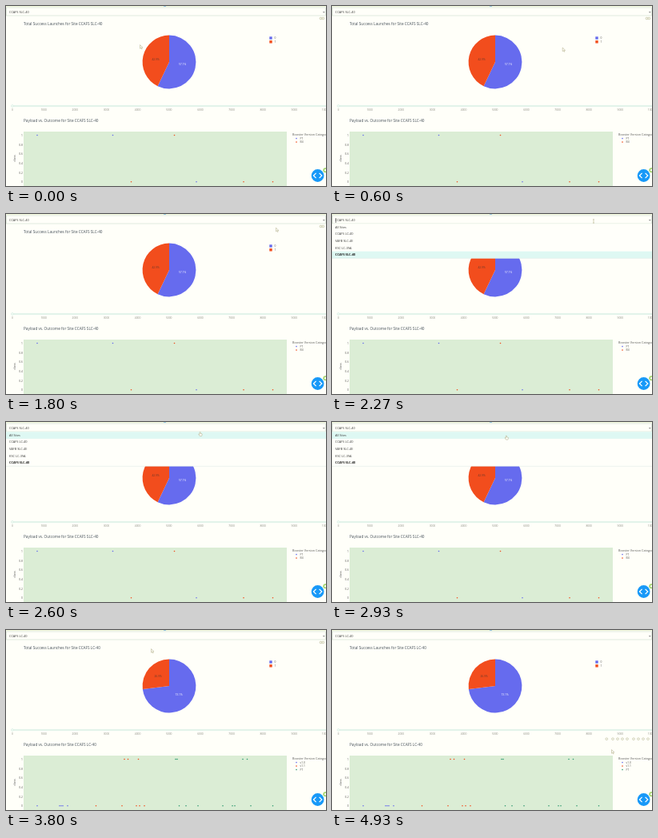
An HTML page for the animation above (4.99 s loop, 400 by 225 pixels).

```html
<!DOCTYPE html>
<html lang="en">
<head>
<meta charset="utf-8">
<title>Launch dashboard</title>
<style>
  html, body { margin: 0; width: 100%; height: 100%; overflow: hidden; background: #fffff9; }
  svg { display: block; width: 100vw; height: 100vh; }
  text { font-family: "Open Sans", "Noto Sans", sans-serif; font-size: 3.3px; fill: #555; }
  .title { font-size: 4.7px; fill: #46505a; }
  .field { font-size: 3.9px; fill: #3c3c3c; }
  .mid { text-anchor: middle; }
  .end { text-anchor: end; }
</style>
</head>
<body>
<svg id="stage" viewBox="0 0 400 225">
  <rect width="400" height="225" fill="#fffff9"/>
  <path d="M0 .5H400" stroke="#eef5d8"/>
  <path d="M197 .4h3" stroke="#78b4dc" stroke-width=".8"/>
  <g id="rail"></g>
  <rect x="22" y="157" width="329" height="68" fill="#dbedd5"/>
  <g id="axis"></g>
  <text class="mid" transform="translate(12 190.5) rotate(-90)" style="font-size:3.8px">class</text>
  <text x="358" y="162" style="font-size:3.8px">Booster Version Category</text>
  <g id="charts"></g>
  <g id="pieBar"></g>
  <g id="plotBar"></g>
  <rect x=".4" y="2" width="399.2" height="10" fill="#fffff9" stroke="#d5e2d4" stroke-width=".7"/>
  <text id="value" class="field" x="4" y="9.2"></text>
  <path d="M395.8 7h3l-1.5 1.7z" fill="#999"/>
  <g id="menu">
    <rect y="12.3" width="400" height="43" fill="#fffffa"/>
    <rect id="hover" width="400" height="8.6" fill="#def8f3"/>
    <g id="options"></g>
    <path d="M0 55.3H400" stroke="#d8e4e0" stroke-width=".5"/>
  </g>
  <path id="caret" d="M4.8 5v6" stroke="#333" stroke-width=".6"/>
  <circle cx="399.3" cy="205.2" r="3" fill="#a5d66f"/>
  <circle cx="399.3" cy="205.2" r="1.3" fill="#fffff9"/>
  <circle cx="389.6" cy="212" r="7.9" fill="#1899f8"/>
  <path d="M387.6 208.8l-3.2 3.2 3.2 3.2M391.6 208.8l3.2 3.2-3.2 3.2" fill="none" stroke="#fff" stroke-width="1.2"/>
  <g id="pointer" fill="#fffff9" stroke="#a8a47c" stroke-width=".5">
    <path id="arrow" d="M0 0v4.6l1.1-1 .8 1.7.8-.4-.8-1.6h1.5z" transform="translate(-1.5 -2.4)"/>
    <path id="beam" fill="none" d="M-1-2.2h2M0-2.2v4.4M-1 2.2h2"/>
    <path id="hand" d="M-.9-2.2q.7-.6 1.1 0v1.6l1.9.5v1.4l-.6 1.3h-2.2l-1.5-2.2.4-.5.9.6z"/>
  </g>
</svg>
<script>
const LOOP = 4990, OPEN = 2070, CLOSE = 3620, UPDATE = 3780, BLINK = 500;
const ROW = 8.6, MENU_TOP = 12.3;
const BLUE = '#666bee', RED = '#f24d1d', GREEN = '#2f9a70';
const el = id => document.getElementById(id);
const show = (id, on) => el(id).style.display = on ? '' : 'none';
const text = (x, y, s, cls = '', extra = '') => `<text x="${x}" y="${y}" class="${cls}" ${extra}>${s}</text>`;
const dot = (x, y, color) => `<circle cx="${x}" cy="${y}" r=".8" fill="${color}"/>`;

const sites = ['All Sites', 'CCAFS LC-40', 'VAFB SLC-4E', 'KSC LC-39A', 'CCAFS SLC-40'];
const views = [
  { site: 'CCAFS SLC-40', share: 57.1, labels: [[220.5, 74.3], [187, 68]],
    wins: [39, 133.5, 210.5], losses: [156.5, 238, 297, 333.5],
    series: ['FT', 'B4'], colors: [BLUE, RED], tint: x => [39, 133.5, 238].includes(x) ? BLUE : RED },
  { site: 'CCAFS LC-40', share: 73.1, labels: [[216, 82], [190, 58.5]],
    wins: [148, 152.5, 165.5, 212, 214, 296, 301.5],
    losses: [39, 67, 69, 71, 77, 112.5, 145, 163, 167, 173, 216.5, 225, 240, 271, 283, 286, 306, 333.5],
    series: ['v1.0', 'v1.1', 'FT'], colors: [BLUE, RED, GREEN],
    tint: x => x < 80 ? BLUE : x < 180 ? RED : GREEN }
];

function sector(from, to, color) {
  const at = p => {
    const a = p / 50 * Math.PI;
    return `${204 + 33.4 * Math.sin(a)} ${70 - 33.4 * Math.cos(a)}`;
  };
  return `<path d="M204 70L${at(from)}A33.4 33.4 0 ${+(to - from > 50)} 1 ${at(to)}z" fill="${color}"/>`;
}

function charts(v) {
  const [big, small] = v.labels;
  return text(22, 24.3, `Total Success Launches for Site ${v.site}`, 'title')
    + sector(0, v.share, BLUE) + sector(v.share, 100, RED)
    + text(...big, v.share + '%', 'mid', 'style="fill:#fff"')
    + text(...small, (100 - v.share).toFixed(1) + '%', 'mid', 'style="fill:#6b3a2a"')
    + [BLUE, RED].map((c, i) =>
        `<rect x="329.3" y="${38.3 + i * 4.8}" width="3.4" height="3.4" fill="${c}"/>`
        + text(335.5, 41.4 + i * 4.8, i)).join('')
    + text(22, 145, `Payload vs. Outcome for Site ${v.site}`, 'title')
    + v.wins.map(x => dot(x, 161.5, v.tint(x))).join('')
    + v.losses.map(x => dot(x, 219.7, v.tint(x))).join('')
    + v.series.map((s, i) => dot(363, 165.6 + i * 4.5, v.colors[i]) + text(367.5, 166.9 + i * 4.5, s)).join('');
}

const icons = (xs, y) => xs.map(x =>
  `<rect x="${x - 1.3}" y="${y - 1.2}" width="2.6" height="2.4" rx=".8" fill="none" stroke="#bdbd9c" stroke-width=".7"/>`).join('');

el('rail').innerHTML = '<path d="M8 125H400" stroke="#c5e8dc" stroke-width="1.1"/>'
  + '<circle cx="8" cy="125" r="1.4" fill="#fffff9" stroke="#c5e8dc" stroke-width=".6"/>'
  + Array.from({ length: 11 }, (_, i) => text(8 + i * 39.15, 130.7, i * 1000, 'mid', 'style="fill:#8c8c84"')).join('');
el('axis').innerHTML = [1, .8, .6, .4, .2, 0].map((n, i) => text(21, 162.9 + i * 11.65, n, 'end')).join('');
el('options').innerHTML = sites.map((s, i) =>
  text(4, 17.8 + i * ROW, s, 'field', i === 4 ? 'style="font-weight:bold;fill:#222"' : '')).join('');
el('pieBar').innerHTML = icons([393.5, 396.3], 15.5);
el('plotBar').innerHTML = icons([343.3, 351, 357, 363, 369, 377, 383, 389, 395], 136.2);

// time, x, y
const path = [[0, 169, 51], [1100, 381, 57], [1300, 381, 57], [2020, 327, 9], [2270, 327, 9],
  [2600, 243, 15], [3350, 183, 26], [3850, 183, 26], [4800, 351, 152], [LOOP, 351, 152]];

function pointerAt(t) {
  const i = path.findIndex(p => p[0] > t);
  const [t0, x0, y0] = path[i - 1], [t1, x1, y1] = path[i];
  const u = (t - t0) / (t1 - t0), k = u * u * (3 - 2 * u);
  return [x0 + (x1 - x0) * k, y0 + (y1 - y0) * k];
}

let current;
function draw(now) {
  const t = now % LOOP, [x, y] = pointerAt(t);
  const open = t >= OPEN && t < CLOSE, view = views[+(t >= UPDATE)];
  if (view !== current) el('charts').innerHTML = charts(current = view);
  el('value').textContent = views[+(t >= CLOSE)].site;
  show('menu', open);
  show('caret', open && Math.floor((t - OPEN) / BLINK) % 2 === 0);
  const row = y < MENU_TOP ? 4 : Math.min(4, Math.floor((y - MENU_TOP) / ROW));
  el('hover').setAttribute('y', MENU_TOP + row * ROW);
  show('pieBar', y > 12 && y < 133);
  show('plotBar', y >= 133);
  const inField = y < 12, onOption = open && !inField;
  show('beam', inField);
  show('hand', onOption);
  show('arrow', !inField && !onOption);
  el('pointer').setAttribute('transform', `translate(${x} ${y})`);
  requestAnimationFrame(draw);
}
draw(0);
</script>
</body>
</html>
```
